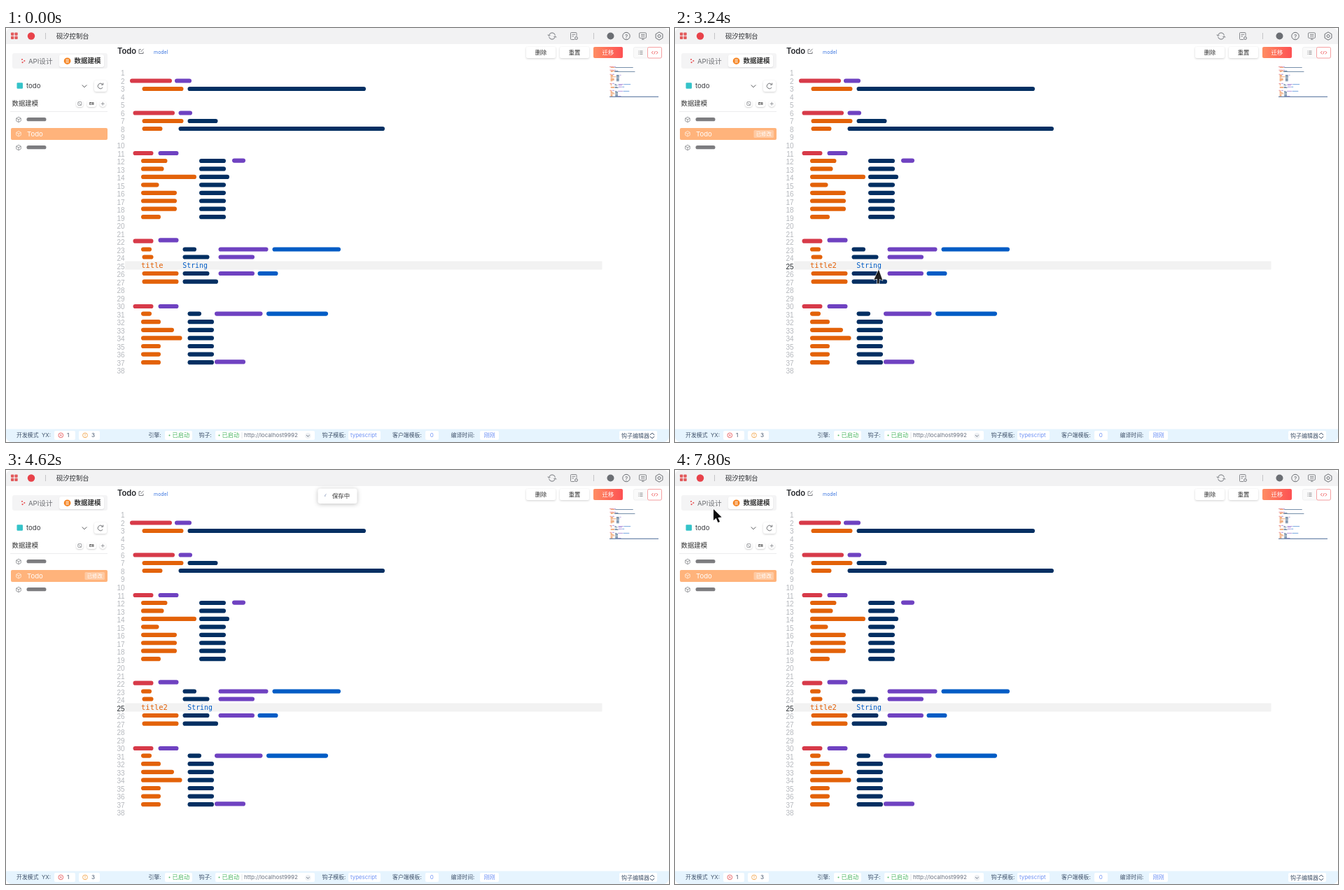
Animation of 947 by 592 pixels, one loop 8 s. Source, as an HTML page with a canvas:

```html
<!DOCTYPE html>
<html lang="zh-CN">
<head>
<meta charset="utf-8">
<title>控制台</title>
<style>
html, body { margin: 0; width: 100%; height: 100%; overflow: hidden; background: #fff; }
canvas { display: block; width: 947px; height: 592px; }
</style>
</head>
<body>
<canvas id="stage" width="947" height="592"></canvas>
<script>
const W = 947, H = 592, LOOP = 8000, TAU = Math.PI * 2;
const UI = 'Inter, "Noto Sans CJK SC", "Noto Sans CJK", sans-serif';
const MONO = '"DejaVu Sans Mono", monospace';
const INK = { r: '#d73a49', p: '#6f42c1', o: '#e36209', n: '#032f62', b: '#005cc5' };

const screen = document.getElementById('stage').getContext('2d');
const backdrop = document.createElement('canvas');
backdrop.width = W;
backdrop.height = H;
let c = backdrop.getContext('2d');

// ---- drawing helpers ----
function box(x, y, w, h, radius, fill, stroke) {
  c.beginPath();
  c.roundRect(x, y, w, h, radius);
  if (fill) { c.fillStyle = fill; c.fill(); }
  if (stroke) { c.strokeStyle = stroke; c.lineWidth = 0.8; c.stroke(); }
}

function raised(x, y, w, h, radius, fill = '#fff', blur = 3, tint = 'rgba(0,0,0,.18)') {
  c.save();
  c.shadowColor = tint;
  c.shadowBlur = blur;
  c.shadowOffsetY = 1;
  box(x, y, w, h, radius, fill);
  c.restore();
}

// y is the optical middle of the text
function text(str, x, y, size, color, weight = 400, align = 'left', family = UI) {
  c.font = `${weight} ${size}px ${family}`;
  c.textAlign = align;
  c.fillStyle = color;
  c.fillText(str, x, y + size * 0.37);
}

function line(color, width, ...pts) {
  c.beginPath();
  for (let i = 0; i < pts.length; i += 2) c.lineTo(pts[i], pts[i + 1]);
  c.strokeStyle = color;
  c.lineWidth = width;
  c.stroke();
}

function ring(x, y, r, color, width = 1, from = 0, to = TAU) {
  c.beginPath();
  c.arc(x, y, r, from, to);
  c.strokeStyle = color;
  c.lineWidth = width;
  c.stroke();
}

function dot(x, y, r, color) {
  c.beginPath();
  c.arc(x, y, r, 0, TAU);
  c.fillStyle = color;
  c.fill();
}

function hexagon(x, y, r, color, width) {
  const pts = [];
  for (let i = 0; i <= 6; i++) {
    const a = i * TAU / 6 - TAU / 4;
    pts.push(x + r * Math.cos(a), y + r * Math.sin(a));
  }
  line(color, width, ...pts);
}

function cube(x, y, color) {
  hexagon(x, y, 3.8, color, 0.8);
  line(color, 0.8, x - 3.2, y - 1.8, x, y, x + 3.2, y - 1.8);
  line(color, 0.8, x, y, x, y + 3.6);
}

// ---- code rows: colour key, left, right, repeated; each also lands in the minimap ----
function row(y, ...bars) {
  for (let i = 0; i < bars.length; i += 3) {
    const [key, x1, x2] = bars.slice(i, i + 3);
    box(x1, y - 3.1, x2 - x1, 6.2, 3.1, INK[key]);
    c.globalAlpha = 0.6;
    c.fillStyle = INK[key];
    c.fillRect(862 + (x1 - 177) * 0.1, 53.7 + (y - 64) * 0.105, (x2 - x1) * 0.1, 0.9);
    c.globalAlpha = 1;
  }
}

const lineY = n => 64.7 + 11.51 * (n - 1);

function drawCode() {
  c.fillStyle = '#f2f2f2';
  c.fillRect(170, 333.5, 681.5, 12);
  for (let n = 1; n <= 38; n++) {
    if (n !== 25) lineNumber(n, '#b5b8bd');
  }

  row(75.5, 'r', 177, 237, 'p', 241, 265);
  row(87, 'o', 194.5, 253.5, 'n', 259.5, 514);
  row(121.5, 'r', 181.5, 241, 'p', 246.5, 266);
  row(133, 'o', 194.5, 253.5, 'n', 259.5, 302.5);
  row(144, 'o', 194.5, 223.5, 'n', 246.5, 541);

  row(179, 'r', 181.5, 210.5, 'p', 217.5, 246.5);
  row(189.6, 'p', 323, 342);
  const fields = [230.5, 225.5, 272, 218.5, 244, 244, 244, 221];
  fields.forEach((end, i) =>
    row(190 + i * 11.45, 'o', 193, end, 'n', 276, i === 2 ? 319 : 314));

  row(304.7, 'r', 181.5, 210.5);
  row(303.4, 'p', 217.5, 246.5);
  row(316.5, 'o', 193, 208, 'n', 252.5, 272, 'p', 303.5, 374.5, 'b', 380.5, 478);
  row(327.5, 'o', 194.5, 210.5, 'n', 252.5, 290.5, 'p', 303.5, 355);
  row(351, 'o', 194.5, 246.5, 'n', 252.5, 290.5, 'p', 303.5, 355, 'b', 359.5, 388.5);
  row(362.7, 'o', 194.5, 246.5, 'n', 252.5, 303);

  row(398, 'r', 181.5, 210.5, 'p', 217.5, 246.5);
  row(408.6, 'o', 193, 208, 'n', 259.5, 279, 'p', 298, 366.5, 'b', 372, 460);
  [221, 240, 251.5, 221, 221, 221].forEach((end, i) =>
    row(420.2 + i * 11.6, 'o', 193, end, 'n', 259.5, 297));
  row(477.4, 'p', 298, 342);
  line('#6f88ad', 1.2, 862, 98.4, 932, 98.4);
}

function lineNumber(n, color) {
  text(n, 169.6, lineY(n), 10, color, 400, 'right', '"Liberation Sans", sans-serif');
}

// ---- chrome ----
function drawTopBar() {
  const gray = '#6b6e73';
  c.fillStyle = '#f2f2f3';
  c.fillRect(0, 0, W, 23);
  for (const x of [7, 12.4]) for (const y of [6.4, 11.8]) box(x, y, 4.3, 4.3, 0.8, '#e25a5c');
  dot(36, 11.5, 5.2, '#e8424a');
  line('#c4c4c6', 1, 56.5, 7, 56.5, 16);
  text('砚汐控制台', 72, 11.5, 9.3, '#2b2d31', 500);

  ring(780, 11.5, 4.6, gray, 1, 0.3, 2.8);
  ring(780, 11.5, 4.6, gray, 1, 3.45, 5.95);
  line(gray, 1, 774, 9.5, 775.4, 11.6, 777.4, 10.2);
  line(gray, 1, 782.4, 12.8, 784.5, 11.4, 786, 13.4);
  box(806.5, 6.5, 8.5, 10, 1, null, gray);
  line(gray, 0.8, 808.5, 9.3, 813, 9.3);
  line(gray, 0.8, 808.5, 11.8, 811, 11.8);
  dot(814.5, 14.5, 3, '#f2f2f3');
  ring(814.5, 14.5, 1.9, gray, 1);
  line('#c4c4c6', 1, 839.5, 7, 839.5, 16);
  dot(863.5, 11.5, 5, gray);
  ring(886, 11.5, 5.2, gray);
  text('?', 886, 11.6, 8, gray, 500, 'center');
  box(904.5, 6.8, 10, 7.6, 1.2, null, gray);
  line(gray, 0.8, 907, 9.5, 912.5, 9.5);
  line(gray, 0.8, 907, 11.7, 912.5, 11.7);
  line(gray, 1, 908, 16.2, 911.5, 16.2);
  hexagon(933, 11.5, 5.7, gray, 1);
  ring(933, 11.5, 2, gray);
}

function drawSidebar() {
  const gray = '#85878b';
  box(9, 36, 136, 22, 3, '#f4f4f5');
  raised(76, 38, 64, 18, 3, '#fff', 2, 'rgba(0,0,0,.1)');
  for (const [x, y] of [[23, 45], [26.3, 47], [23.6, 49.2]]) dot(x, y, 1.1, '#e8565a');
  text('API设计', 32, 47.3, 9.6, '#6d6f73');
  dot(87.6, 47.2, 4.8, '#f5821f');
  for (const y of [45.2, 47.2, 49.2]) line('#fff', 0.9, 85.4, y, 89.8, y);
  text('数据建模', 97.5, 46.8, 9.5, '#333', 600);

  box(15.5, 78.3, 8.5, 8.5, 1.2, '#35c3c9');
  text('todo', 29, 82.8, 9.6, '#3a3c40');
  line('#55575b', 1, 108.7, 81.5, 112, 84.8, 115.3, 81.5);
  raised(126, 75, 18, 16, 3);
  ring(135, 83, 3.8, '#65676b', 0.9, 0.6, 5.6);
  line('#65676b', 0.9, 138.7, 78.6, 138.7, 81.2, 136, 81.2);

  text('数据建模', 8.5, 107.3, 9.4, '#333', 500);
  raised(100, 103.5, 10.5, 9.5, 4, '#fff', 2);
  box(102.8, 105.6, 5, 5, 0.8, null, gray);
  line(gray, 0.7, 103.5, 106.5, 107, 110);
  raised(115.5, 103.5, 13.5, 9.5, 4, '#fff', 2);
  text('ER', 122.3, 108.3, 5.4, '#444', 700, 'center');
  raised(133.5, 103.5, 9.5, 9.5, 4.7, '#fff', 2);
  line(gray, 0.8, 135.7, 108.3, 140.7, 108.3);
  line(gray, 0.8, 138.2, 105.8, 138.2, 110.8);
  line('#ececee', 1, 6, 119.5, 145, 119.5);

  for (const y of [131, 171]) {
    cube(18, y, gray);
    box(29.5, y - 2.9, 28, 5.2, 2.6, '#7d7d80');
  }
  box(7, 143, 138, 17, 2, '#ffb37b');
  cube(18, 151.3, '#fff0e2');
  text('Todo', 30, 151, 9.6, '#fff');
}

function drawHeader() {
  text('Todo', 159, 33, 11.2, '#24262a', 600);
  line('#6b6e73', 0.9, 193, 30.7, 190, 30.7, 190, 36.5, 196, 36.5, 196, 33.8);
  line('#6b6e73', 0.9, 192.5, 34, 196.5, 29.8);
  text('model', 211, 34.4, 7, '#3f78e0');

  raised(743, 27, 42, 16, 2);
  text('删除', 764, 34.7, 8.3, '#333', 400, 'center');
  raised(791, 27, 42, 16, 2);
  text('重置', 812, 34.7, 8.3, '#333', 400, 'center');
  const warm = c.createLinearGradient(839, 0, 881, 0);
  warm.addColorStop(0, '#ff8d63');
  warm.addColorStop(1, '#fd5052');
  box(839, 27, 42, 16, 2, warm);
  text('迁移', 860, 34.7, 8.3, '#fff', 400, 'center');

  box(896.5, 27.5, 40, 15.5, 2, '#fafafa', '#ededee');
  for (const y of [33, 35.2, 37.4]) {
    line('#77797d', 0.8, 905.3, y, 909.5, y);
    line('#77797d', 0.8, 903.4, y, 904.3, y);
  }
  box(916.5, 27.5, 20, 15.5, 2, '#fff', '#f58a8c');
  line('#ee5558', 0.9, 924.4, 33, 922.3, 35.2, 924.4, 37.4);
  line('#ee5558', 0.9, 928.8, 33, 930.9, 35.2, 928.8, 37.4);
  line('#ee5558', 0.8, 927.3, 33, 925.9, 37.4);
}

function drawStatusBar() {
  const y = 582, label = '#41536b', blue = '#6f92f5', green = '#4fb866';
  const pill = (x1, x2) => box(x1, 576, x2 - x1, 13, 2, '#fff');
  const started = x => {
    dot(x, y + 0.6, 1, green);
    text('已启动', x + 4, y, 8.2, green);
  };
  c.fillStyle = '#e6f4fe';
  c.fillRect(0, 573.5, W, H - 573.5);

  text('开发模式', 15, y, 7.9, label);
  text('YX:', 51, y, 7.9, label);
  pill(69, 99);
  ring(78.3, 582.4, 3.4, '#e5494d', 0.8);
  line('#e5494d', 0.8, 77, 581.1, 79.6, 583.7);
  line('#e5494d', 0.8, 79.6, 581.1, 77, 583.7);
  text('1', 87, y, 8.2, label);
  pill(104, 134);
  ring(113, 582.4, 3.4, '#f0a040', 0.8);
  line('#f0a040', 0.8, 113, 580.4, 113, 583);
  dot(113, 584.2, 0.5, '#f0a040');
  text('3', 122, y, 8.2, label);

  text('引擎:', 203.5, y, 7.9, label);
  pill(227, 266);
  started(233.5);
  text('钩子:', 275.5, y, 7.9, label);
  pill(299, 441);
  started(304.5);
  line('#dcdfe4', 0.8, 337, 578, 337, 587);
  text('http://localhost9992', 340, y, 8, '#687180');
  dot(431.3, 583, 4.3, '#eef1f4');
  line('#687180', 0.9, 429, 582.2, 431.3, 584.2, 433.6, 582.2);

  text('钩子模板:', 451.5, y, 7.9, label);
  pill(489, 535);
  text('typescript', 492, y, 7.9, blue);
  text('客户端模板:', 552, y, 7.9, label);
  pill(599, 618);
  text('0', 608.3, y, 8, blue, 400, 'center');
  text('编译时间:', 635.5, y, 7.9, label);
  pill(677, 704);
  text('刚刚', 690.7, y, 8, blue, 400, 'center');
  pill(876, 930);
  text('钩子编辑器', 879, 583, 8, label, 500);
  line(label, 1, 919.8, 582, 923, 579.2, 926.2, 582);
  line(label, 1, 919.8, 584, 923, 586.8, 926.2, 584);
}

function buildBackdrop() {
  c.fillStyle = '#fff';
  c.fillRect(0, 0, W, H);
  c.save();
  c.beginPath();
  c.roundRect(0, 0, W, H, 8);
  c.clip();
  drawTopBar();
  drawSidebar();
  drawHeader();
  drawCode();
  drawStatusBar();
  c.restore();
}

// ---- motion ----
const ramp = (t, a, b) => Math.min(1, Math.max(0, (t - a) / (b - a)));
const smooth = u => u * u * (3 - 2 * u);
const mix = (a, b, u) => a + (b - a) * u;

function faded(alpha, draw) {
  if (alpha <= 0) return;
  c.save();
  c.globalAlpha = alpha;
  draw();
  c.restore();
}

function pointer(x, y, alpha = 1, tilt = 0) {
  faded(alpha, () => {
    c.translate(x, y);
    c.rotate(tilt);
    c.beginPath();
    c.moveTo(0, 0);
    for (const [px, py] of [[0, 16], [3.7, 12.8], [6.4, 19], [9, 17.9], [6.4, 11.9], [11.6, 11.6]]) c.lineTo(px, py);
    c.closePath();
    c.lineJoin = 'round';
    c.lineWidth = 1.4;
    c.strokeStyle = '#fff';
    c.stroke();
    c.fillStyle = '#0b0b0c';
    c.fill();
  });
}

function drawField(t) {
  const edited = ramp(t, 2340, 2460);
  const field = (name, typeX) => {
    text(name, 193, 339.6, 10.5, INK.o, 400, 'left', MONO);
    text('String', typeX, 339.4, 9.85, INK.b, 400, 'left', MONO);
  };
  lineNumber(25, t < 1560 ? '#b5b8bd' : '#24292e');
  faded(1 - edited, () => field('title', 252.3));
  faded(edited, () => {
    field('title2', 259.3);
    box(112.5, 146, 28.5, 11, 1.5, 'rgba(255,255,255,.3)');
    text('已修改', 126.8, 151.4, 7.4, '#fff', 400, 'center');
  });
  const caret = ramp(t, 1830, 2010) - ramp(t, 2160, 2340);
  faded(caret, () => line('#24292e', 1, 225.3, 334, 225.3, 345.5));
}

function drawToast(t) {
  faded(ramp(t, 4320, 4500) - ramp(t, 5730, 5910), () => {
    raised(445.5, 26.5, 56, 21.5, 3.5, '#fff', 6, 'rgba(0,0,0,.25)');
    const spin = Math.PI + TAU * (t - 5550) / 1000;
    ring(458.6, 37.2, 3, '#8094b8', 0.8, spin - 0.75, spin + 0.75);
    text('保存中', 466, 36.8, 8.4, '#333');
  });
}

function drawPointer(t) {
  if (t >= 930 && t < 1110) {
    const u = ramp(t, 930, 1080);
    pointer(mix(437, 358, u), mix(586, 518, u));
  } else if (t >= 1350 && t < 1740) {
    pointer(159.5, 341, 1 - ramp(t, 1530, 1740));
  } else if (t >= 2970 && t < 4300) {
    const u = t >= 3930 ? 1 : smooth(ramp(t, 2970, 3947) ** 2.63);
    const alpha = ramp(t, 2940, 3270) - ramp(t, 4080, 4290);
    pointer(mix(289, 860.5, u), mix(346.5, 49.3, u), alpha, 0.44);
  } else if (t >= 6510) {
    const u = smooth(ramp(t, 7350, 7800));
    pointer(mix(854.5, 55, u), mix(43.8, 56, u), ramp(t, 6480, 6900));
  }
}

function frame(now) {
  const t = now % LOOP;
  c.drawImage(backdrop, 0, 0);
  drawField(t);
  drawToast(t);
  drawPointer(t);
  requestAnimationFrame(frame);
}

buildBackdrop();
c = screen;
requestAnimationFrame(frame);
</script>
</body>
</html>
```
